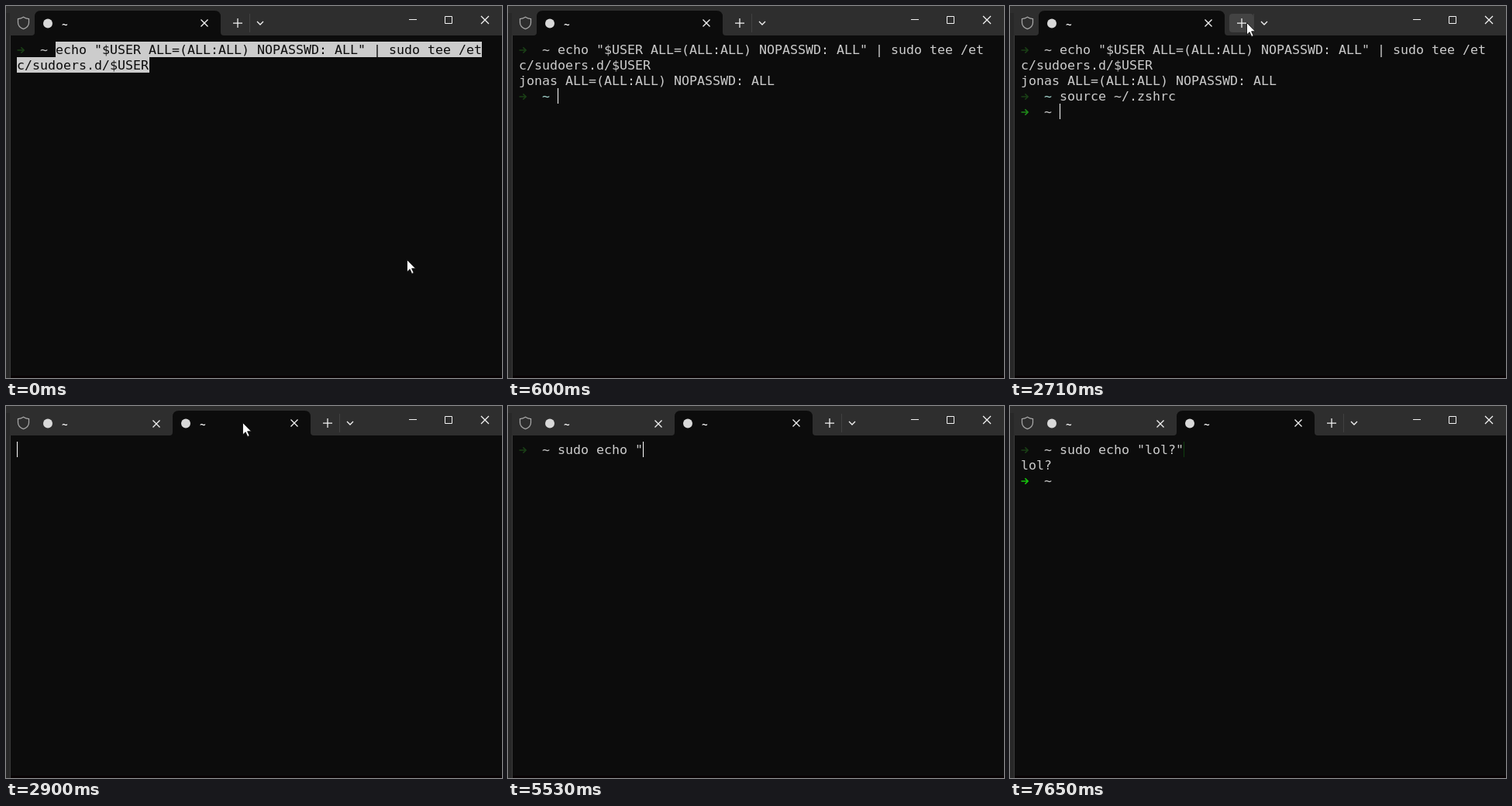
An HTML page that plays this animation: 640x480 px, repeating every 8000 ms.

```html
<!DOCTYPE html>
<html lang="en">
<head>
<meta charset="utf-8">
<title>Terminal session</title>
<style>
  html, body { margin: 0; width: 100%; height: 100%; overflow: hidden; background: #0c0c0c; }
  svg { display: block; width: 640px; height: 480px; }
  text { white-space: pre; }
  .mono { font: 16.61px "DejaVu Sans Mono", monospace; }
  .title { font: 600 13.5px "Open Sans", sans-serif; fill: #fff; }
  .tip { font: 11.5px "Open Sans", sans-serif; fill: #1a1a1a; }
  .icon { fill: none; stroke: #f4f4f4; stroke-width: 1.25; }
</style>
</head>
<body>
<svg id="stage" viewBox="0 0 640 480">
  <rect width="640" height="480" fill="#2e2e2e"/>
  <rect y="9" width="5" height="471" fill="#282828"/>
  <rect x="5" y="38" width="1" height="442" fill="#3a3a3a"/>
  <rect x="6" y="38" width="634" height="442" fill="#0c0c0c"/>
  <rect x="6" y="477" width="634" height="3" fill="#080304"/>
  <path class="icon" style="stroke:#a8a8a8" d="M22.5 14.3q3 2.2 7 2.4v4.8q0 5.5-7 8.2q-7-2.7-7-8.2v-4.8q4-.2 7-2.4z"/>
  <path class="icon" style="stroke-width:1" d="M520 17.5h10M566.5 13.5h9v9h-9z"/>
  <path class="icon" d="M613 13l10 10m0-10l-10 10"/>
  <g id="scene"></g>
</svg>
<script>
const LOOP = 8000;
const GREY = '#cccccc', DIM = '#1a3f16', MID = '#1f8a1a', BRIGHT = '#16c60c';
const COMMAND = ['echo "$USER ALL=(ALL:ALL) NOPASSWD: ALL" | sudo tee /et', 'c/sudoers.d/$USER'];
const TYPED = 'sudo echo "lol?"';
// [time, number of characters typed]
const KEYS = [[4540, 1], [4630, 2], [4740, 3], [4840, 4], [4940, 6], [5160, 8], [5250, 10],
  [5530, 11], [5660, 12], [5850, 13], [5940, 14], [6560, 15], [6750, 16]];

const colX = col => 14 + col * 10;
const rowY = row => 46 + row * 20;
const rect = (x, y, w, h, fill, extra = '') =>
  `<rect x="${x}" y="${y}" width="${w}" height="${h}" fill="${fill}" ${extra}/>`;
const label = (x, y, str, cls, extra = '') => `<text x="${x}" y="${y}" class="${cls}" ${extra}>${str}</text>`;
const icon = d => `<path class="icon" d="${d}"/>`;

const print = (col, row, str, fill = GREY) => label(colX(col), rowY(row) + 16, str, 'mono', `fill="${fill}"`);
const caret = (col, row, fill = '#fff') => rect(colX(col), rowY(row), 1, 20, fill);
const prompt = (row, arrow, tilde = GREY) =>
  `<path d="M14.5 ${rowY(row) + 11}h8.5m-3.6-3.6l3.8 3.6l-3.8 3.6" fill="none" stroke="${arrow}" stroke-width="1.5"/>`
  + print(3, row, '~', tilde);

const activeTab = (x, w) =>
  `<path fill="#0c0c0c" d="M${x - 4} 38q4 0 4-4V14q0-8 8-8h${w - 16}q8 0 8 8v20q0 4 4 4z"/>`;

// The contents of an inactive tab sit one pixel lower.
const tabContent = (x, closeX, active) => {
  const y = active ? 22 : 23;
  return `<circle cx="${x + 17}" cy="22.5" r="6" fill="#d9d9d9"/>`
    + label(x + 35, 28.5, '~', 'title')
    + icon(`M${closeX - 4.5} ${y - 4.5}l9 9m0-9l-9 9`);
};

const tabButtons = (x, hover) =>
  (hover ? rect(x - 16, 10, 31, 24, '#434343', 'rx="4"') : '')
  + rect(x + 15, 10, 1, 24, '#404040')
  + icon(`M${x - 6} 22h12m-6-6v12M${x + 25} 20l4 4l4-4`);

const mouse = (x, y) =>
  `<path transform="translate(${x} ${y})" d="M.5 .5v15.6l3.6-3.4l2.6 5.8l2.5-1.1l-2.6-5.6h4.9z"
    fill="#fff" stroke="#111" stroke-width=".9"/>`;

const tooltip = () =>
  `<g style="filter:drop-shadow(0 2px 2px rgba(0,0,0,.5))">${rect(306, 33, 208, 62, '#cfcfcf', 'rx="3"')}</g>`
  + label(315, 52, 'Open a new tab', 'tip')
  + label(315, 68, 'Alt+Click to split the current window', 'tip', 'font-style="italic"')
  + label(315, 84, 'Shift+Click to open a new window', 'tip', 'font-style="italic"');

function firstTab(t) {
  const selected = t < 500, hover = t >= 1500;
  let out = activeTab(37, 240) + tabContent(37, 256, true) + tabButtons(299, hover) + prompt(0, DIM);
  if (selected) out += rect(64, 46, 550, 20, GREY) + rect(14, 66, 171, 20, GREY);
  const ink = selected ? '#0c0c0c' : GREY;
  out += print(5, 0, COMMAND[0], ink) + print(0, 1, COMMAND[1], ink);
  if (t >= 600) out += print(0, 2, 'jonas ALL=(ALL:ALL) NOPASSWD: ALL') + prompt(3, DIM, '#a5d6d0');
  if (hover) out += print(5, 3, 'source ~/.zshrc') + prompt(4, MID);
  if (t >= 600) out += caret(5, hover ? 4 : 3);
  if (hover && t < 2710) out += tooltip();
  if (selected) out += mouse(517, 327);
  if (hover) out += mouse(305, 21);
  return out;
}

function secondTab(t) {
  let out = tabContent(37, 194, false) + activeTab(215, 178) + tabContent(215, 372, true) + tabButtons(415, false);
  if (t < 3330) return out + (t >= 2900 ? caret(0, 0) : '') + mouse(305, 21);
  const count = KEYS.filter(([at]) => t >= at).length;
  const length = count ? KEYS[count - 1][1] : 0;
  out += prompt(0, DIM) + print(5, 0, TYPED.slice(0, length));
  if (t < 7060) return out + caret(5 + length, 0);
  out += caret(21, 0, '#0f3f0f') + print(0, 1, 'lol?') + prompt(2, BRIGHT);
  return out + (t < 7650 ? caret(5, 2) : '');
}

const scene = document.getElementById('scene');
const start = performance.now();
let shown = '';
function frame() {
  const t = (performance.now() - start) % LOOP;
  const next = t < 2810 ? firstTab(t) : secondTab(t);
  if (next !== shown) scene.innerHTML = shown = next;
  requestAnimationFrame(frame);
}
frame();
</script>
</body>
</html>
```
